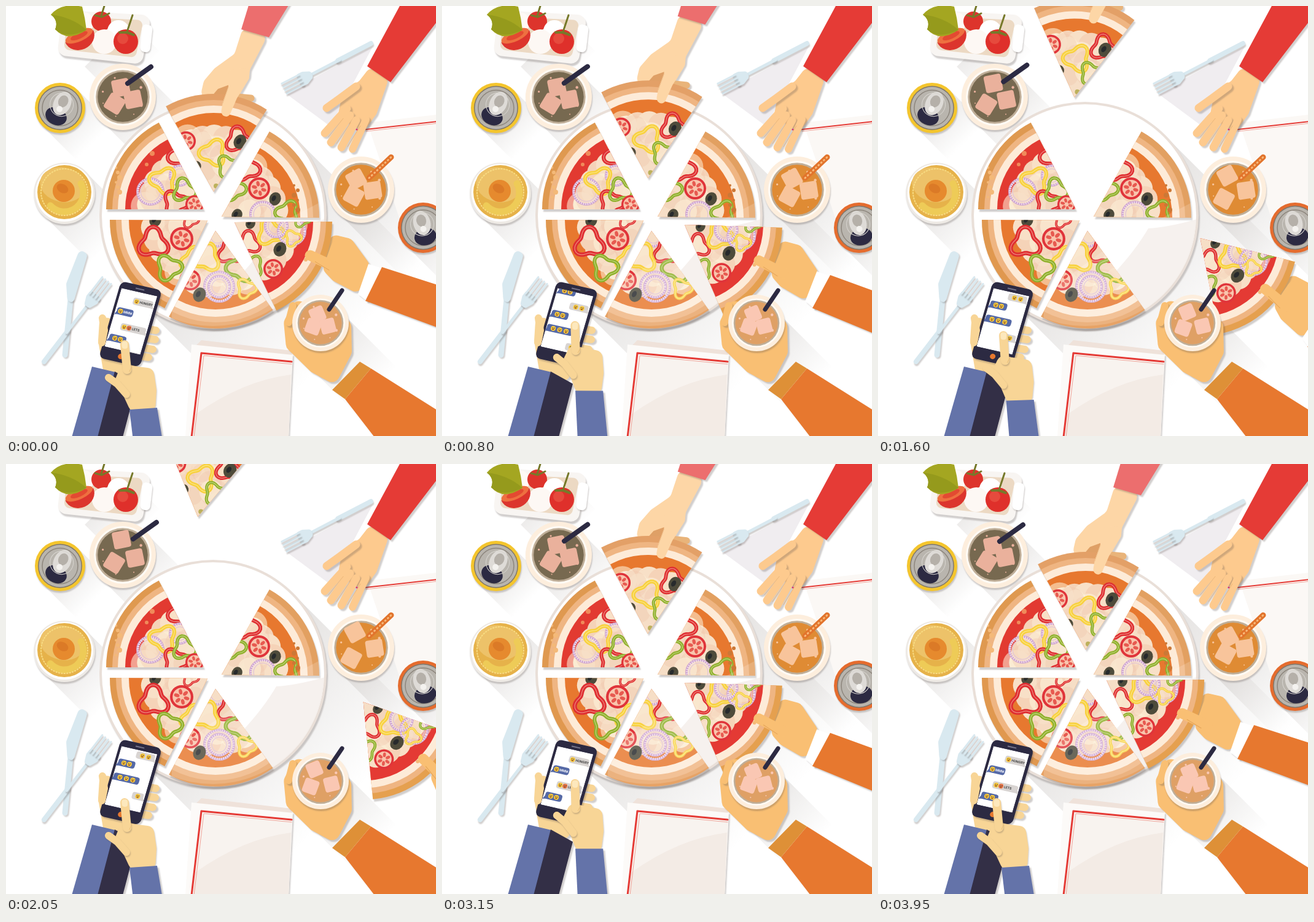
Recreate the animation shown at these times as an HTML page with a canvas. Size 700 by 700 pixels, loop 4000 ms.

```html
<!DOCTYPE html>
<html lang="en">
<head>
<meta charset="utf-8">
<title>Pizza table</title>
<style>
html, body { margin: 0; width: 100%; height: 100%; overflow: hidden; background: #fff; }
canvas { display: block; width: 700px; height: 700px; }
</style>
</head>
<body>
<canvas id="stage" width="700" height="700"></canvas>
<script>
const c = document.getElementById('stage').getContext('2d');
const TAU = Math.PI * 2, DEG = Math.PI / 180, LOOP = 4000, R = 159;
const RED = '#e53b36', ORANGE = '#e7782f', YELLOW = '#f8d13f', GREEN = '#8fb02c';
const NAVY = '#2c2a42', BLUE = '#6473a9', SKIN = '#f9bf73', STEEL = '#d9e9f0';

// ---- motion helpers
function curve(keys) {
  const n = keys.length, slope = [];
  const d = i => (keys[i + 1][1] - keys[i][1]) / (keys[i + 1][0] - keys[i][0]);
  for (let i = 0; i < n; i++) {
    const a = i ? d(i - 1) : 0, b = i < n - 1 ? d(i) : 0;
    slope.push(a * b > 0 ? 2 * a * b / (a + b) : 0);
  }
  return t => {
    let i = 0;
    while (i < n - 2 && t > keys[i + 1][0]) i++;
    const [x, y] = keys[i], [X, Y] = keys[i + 1], h = X - x, u = (t - x) / h, v = 1 - u;
    return v * v * (1 + 2 * u) * y + u * u * (3 - 2 * u) * Y + h * u * v * (v * slope[i] - u * slope[i + 1]);
  };
}
const topPull = curve([[0, 0], [800, .1], [1200, .285], [2000, 1], [2550, .515], [3150, .12], [4000, 0]]);
const sidePull = curve([[0, 0], [800, .108], [1200, .31], [2000, 1], [2550, .425], [3150, .108], [4000, 0]]);
const ramp = (t, a, b) => {
  const u = Math.min(1, Math.max(0, (t - a) / (b - a)));
  return u * u * (3 - 2 * u);
};

// ---- drawing helpers
function fill(color) { c.fillStyle = color; c.fill(); }
function circ(x, y, r, color) { c.beginPath(); c.arc(x, y, r, 0, TAU); fill(color); }
function oval(x, y, rx, ry, rot, color) {
  c.beginPath(); c.ellipse(x, y, rx, ry, rot, 0, TAU); fill(color);
}
function ring(x, y, r, w, color) {
  c.beginPath(); c.arc(x, y, r, 0, TAU);
  c.lineWidth = w; c.strokeStyle = color; c.stroke();
}
function path(p, closed = true) {
  c.beginPath();
  for (let i = 0; i < p.length; i += 2) c.lineTo(p[i], p[i + 1]);
  if (closed) c.closePath();
}
function poly(color, ...p) { path(p); fill(color); }
function line(color, w, ...p) {
  path(p, false);
  c.lineWidth = w; c.strokeStyle = color; c.lineCap = c.lineJoin = 'round'; c.stroke();
}
// closed shape with softened corners
function soft(color, r, ...p) {
  const n = p.length / 2, at = i => [p[(i % n) * 2], p[(i % n) * 2 + 1]];
  const [ax, ay] = at(0), [bx, by] = at(n - 1);
  c.beginPath();
  c.moveTo((ax + bx) / 2, (ay + by) / 2);
  for (let i = 0; i < n; i++) c.arcTo(...at(i), (at(i)[0] + at(i + 1)[0]) / 2, (at(i)[1] + at(i + 1)[1]) / 2, r);
  c.closePath(); fill(color);
}
function box(x, y, w, h, r, color) { c.beginPath(); c.roundRect(x, y, w, h, r); fill(color); }
function at(x, y, rot, draw) {
  c.save(); c.translate(x, y); c.rotate(rot); draw(); c.restore();
}
function cast(x, y, r, len, alpha = .2) {
  at(x, y, Math.PI / 4, () => {
    const g = c.createLinearGradient(0, 0, len, 0);
    g.addColorStop(0, `rgba(135,125,118,${alpha})`);
    g.addColorStop(1, 'rgba(135,125,118,0)');
    c.fillStyle = g; c.fillRect(0, -r, len, 2 * r);
  });
}
function lift(draw, x = 3, y = 3) {
  c.save();
  c.shadowColor = 'rgba(90,80,75,.28)'; c.shadowOffsetX = x; c.shadowOffsetY = y; c.shadowBlur = 2;
  draw(); c.restore();
}

// ---- toppings
const pepper = color => (x, y, s, rot = 0) => at(x, y, rot, () => {
  c.beginPath();
  for (let i = 0; i <= 40; i++) {
    const a = i / 40 * TAU, r = s * (.82 + .2 * Math.cos(3 * a));
    c.lineTo(r * Math.cos(a), r * Math.sin(a));
  }
  c.closePath();
  c.lineWidth = s * .27; c.strokeStyle = color; c.stroke();
  c.lineWidth = 1; c.strokeStyle = 'rgba(255,255,230,.5)'; c.stroke();
});
const red = pepper('#df2f32'), yellow = pepper(YELLOW), green = pepper(GREEN);
function onion(x, y, r) {
  ring(x, y, r, 4, '#cfa6d0');
  c.setLineDash([1.5, 2]); c.lineCap = 'butt';
  ring(x, y, r - 1, 4, '#f2dfea');
  c.setLineDash([]);
  ring(x, y, r - 5, 1.2, '#dfc2da');
}
function tomato(x, y, r) {
  circ(x, y, r, '#e0343a'); circ(x, y, r * .78, '#f9c5ad');
  for (let i = 0; i < 6; i++) at(x, y, i * TAU / 6 + .3, () => oval(r * .44, 0, r * .24, r * .15, 0, '#e75a50'));
}
function olive(x, y, r = 11) {
  oval(x, y, r * .85, r, .4, '#4e4b3b'); oval(x - 2, y - 1, r * .3, r * .45, .5, '#272a2c');
}

// ---- pizza
function sector(r, a, b, color) {
  c.beginPath(); c.moveTo(0, 0); c.arc(0, 0, r, a, b); c.closePath(); fill(color);
}
function slice(x, y, from, to, sauce, crust, tops) {
  const a = from * DEG, b = to * DEG;
  at(x, y, 0, () => {
    lift(() => sector(R, a, b, crust), 2, 4);
    c.save();
    c.beginPath(); c.moveTo(0, 0); c.arc(0, 0, R, a, b); c.closePath(); c.clip();
    circ(0, 0, R - 10, '#efb582');
    circ(0, 0, R - 19, '#fdebd8');
    circ(0, 0, R - 31, sauce);
    circ(0, 0, 84, '#f6dec6');
    for (let i = 0; i < 5; i++) {
      const q = a + (b - a) * (i + .4) / 5;
      circ(88 * Math.cos(q), 88 * Math.sin(q), 21, i % 2 ? '#f5d3b8' : '#f8e0c7');
    }
    for (let i = 0; i < 9; i++) {
      const q = a + (b - a) * ((i * .38 + .15) % 1), r = 35 + (i * 37) % 62;
      circ(r * Math.cos(q), r * Math.sin(q), 15 + i % 3 * 4, i % 2 ? 'rgba(255,246,222,.55)' : 'rgba(238,194,168,.35)');
    }
    c.translate(-x, -y);
    tops();
    c.restore();
  });
}
function topSlice() {
  slice(338, 302, 240.7, 303, ORANGE, '#e3a067', () => {
    onion(288, 264, 17); olive(309, 262, 10); tomato(293, 220, 16);
    red(378, 218, 22, .4); yellow(337, 239, 23, 1); green(361, 261, 19, 2);
    olive(381, 221, 12); red(394, 258, 14); circ(342, 293, 4, '#bcb15c');
  });
}
function sideSlice() {
  slice(372, 352, -.4, 64.6, '#e43a34', '#e5a04f', () => {
    olive(398, 354, 9); red(395, 386, 20, .5); yellow(430, 368, 23, .2);
    onion(465, 367, 22); green(482, 346, 15); onion(440, 358, 18);
    olive(446, 396, 12); green(402, 424, 18, 1); tomato(435, 428, 16);
    yellow(467, 378, 14, 2); circ(488, 413, 3, '#f4b978');
  });
}
function restingSlices() {
  slice(322, 331, 180, 242.6, '#e23a31', '#df9950', () => {
    red(286, 243, 23, .8); onion(283, 276, 16); onion(235, 302, 21);
    yellow(256, 284, 23, 1.2); red(276, 321, 22, 2); green(290, 300, 20, .3); tomato(307, 323, 15);
    for (let i = 0; i < 7; i++) circ(179 + i % 3 * 3, 263 + i * 8, 2 + i % 3, '#f4b978');
    circ(238, 240, 4, '#f08a5a'); circ(229, 258, 3, '#f08a5a');
  });
  slice(328, 349, 180, 244, ORANGE, '#e0984f', () => {
    olive(243, 345, 11); red(240, 386, 26, .5); tomato(286, 379, 19);
    red(295, 350, 16); yellow(305, 414, 22, .7); green(265, 426, 22, 2); tomato(299, 446, 17);
  });
}
function wedges() {
  restingLeft();
  slice(341, 366, 54, 118.5, ORANGE, '#e7a366', () => {
    onion(344, 376, 15); red(365, 400, 22, .5); yellow(326, 410, 24, .8);
    green(382, 426, 24, 1); green(411, 431, 14); tomato(300, 446, 17);
    onion(347, 457, 24); onion(347, 457, 17); olive(315, 470, 12); yellow(391, 460, 17, 2);
  });
  slice(351, 343, 299.3, 360.6, ORANGE, '#e2a061', () => {
    red(391, 264, 23, .2); green(371, 298, 20); tomato(412, 297, 18); olive(438, 314, 11);
    onion(418, 339, 20); green(458, 336, 20, 1); olive(376, 340, 10);
    for (let i = 0; i < 6; i++) circ(469 + i % 2 * 6, 292 + i * 8, 2 + i % 3, '#cc7836');
  });
}
function restingLeft() {
  slice(322, 331, 180, 242.6, '#e23a31', '#df9950', () => {
    red(286, 243, 23, .8); onion(283, 276, 16); onion(235, 302, 21);
    yellow(256, 284, 23, 1.2); red(276, 321, 22, 2); green(290, 300, 20, .3); tomato(307, 323, 15);
    for (let i = 0; i < 7; i++) circ(179 + i % 3 * 3, 263 + i * 8, 2 + i % 3, '#f4b978');
    circ(238, 240, 4, '#f08a5a'); circ(229, 258, 3, '#f08a5a');
  });
  slice(328, 349, 116, 180.4, ORANGE, '#e0984f', () => {
    olive(243, 349, 11); red(240, 386, 26, .5); tomato(286, 379, 19);
    red(300, 348, 14); yellow(305, 414, 22, .7); green(265, 426, 22, 2); tomato(299, 446, 17);
  });
}
function plate() {
  lift(() => circ(337, 341, 185, '#e9dfd8'), 2, 4);
  circ(337, 341, 181, '#fff');
  c.save();
  c.beginPath(); c.arc(337, 341, 181, 0, TAU); c.clip();
  c.beginPath(); c.moveTo(268, 540); c.quadraticCurveTo(395, 440, 440, 362);
  c.quadraticCurveTo(475, 360, 530, 344); c.lineTo(530, 540); c.closePath(); fill('#f4eeea');
  c.restore();
}
function glare() {
  c.save();
  c.beginPath(); c.arc(337, 341, 180, 0, TAU); c.clip();
  poly('rgba(255,255,255,.16)', 270, 470, 385, 385, 530, 310, 530, 540, 270, 540);
  c.restore();
}

// ---- table things
function can(x, y, rim, flip) {
  lift(() => circ(x, y, 41, rim), 1, 3);
  circ(x, y, 36, '#7f776c'); circ(x, y, 34.5, '#b9b5ae');
  ring(x, y, 29, 1.5, '#8d867d');
  at(x, y, flip ? -.25 : .45, () => {
    oval(0, 15, 18, 14, 0, NAVY);
    oval(0, -8, 14, 20, 0, '#dedbd7');
    oval(0, -12, 8, 10, 0, '#b5b0a9');
    ring(0, -6, 19, 1, '#d8d5d0');
    circ(0, 2, 5, '#f4f2ef');
  });
}
function cube(x, y, s, rot, color) {
  at(x, y, rot, () => box(-s / 2, -s / 2, s, s, 4, color));
}
function cup(x, y, r, drink, ice, s, cubes) {
  lift(() => circ(x, y, r, '#fdeedd'), 1, 3);
  circ(x, y, r * .87, '#fffaf4'); circ(x, y, r * .81, '#bfae98'); circ(x, y, r * .755, drink);
  for (let i = 0; i < 8; i++) {
    const a = i * 2.4 + 1;
    circ(x + r * .62 * Math.cos(a), y + r * .62 * Math.sin(a), 1 + i % 3 * .6, ice);
  }
  for (const [cx, cy, rot] of cubes) cube(cx, cy, s, rot, ice);
}
function glass() {
  lift(() => circ(95, 305, 50, '#eeeae5'), 1, 3);
  circ(95, 304, 47, '#fff'); circ(95, 303, 44, '#e6b24a');
  oval(92, 291, 37, 28, .2, '#edc269');
  c.beginPath(); c.arc(95, 304, 31, -.5, 2.4);
  c.lineWidth = 11; c.strokeStyle = '#eecb57'; c.stroke();
  circ(94, 301, 18, '#e68a2e'); oval(92, 297, 10, 7, .5, '#db7a27');
  c.setLineDash([1.5, 3]); ring(95, 303, 38, 2, '#f8dc83'); c.setLineDash([]);
}
function tray() {
  lift(() => soft('#f8f5f2', 14, 92, 7, 237, 15, 221, 95, 83, 80), 2, 4);
  soft('#ecd9c3', 9, 100, 17, 224, 23, 211, 84, 94, 71);
  lift(() => soft('#fff', 7, 222, 28, 239, 33, 234, 77, 218, 73), 1, 2);
  circ(126, 27, 17, '#fffaf6');
  circ(155, 25, 16, '#dd342c');
  line('#76792a', 3, 155, 16, 160, 0); line('#76792a', 3, 145, 15, 156, 18, 168, 12);
  circ(183, 41, 18, '#fff'); circ(160, 58, 20, '#fdf8f4');
  at(121, 53, -.42, () => {
    c.beginPath(); c.ellipse(0, -4, 25, 22, 0, 0, Math.PI); fill('#dc352d');
    oval(0, -5, 24, 9, 0, '#ee7040'); oval(0, -5, 15, 5, 0, '#e34a31');
  });
  circ(195, 58, 20, '#df302b'); circ(190, 53, 9, '#e64a3d');
  line('#76792a', 3, 197, 42, 206, 15); line('#76792a', 4, 185, 43, 197, 43, 208, 47);
  c.beginPath(); c.moveTo(73, 14); c.quadraticCurveTo(90, -6, 124, 1);
  c.quadraticCurveTo(129, 20, 131, 39); c.quadraticCurveTo(100, 60, 80, 38);
  c.quadraticCurveTo(86, 24, 73, 14); fill('#a4a621');
  c.beginPath(); c.moveTo(73, 14); c.quadraticCurveTo(108, 18, 131, 39);
  c.quadraticCurveTo(98, 55, 80, 38); c.quadraticCurveTo(86, 24, 73, 14); fill('#959a1c');
}
function fork(x, y, rot, len) {
  at(x, y, rot, () => lift(() => {
    line(STEEL, 8, 0, 0, len * .38, 0);
    line(STEEL, 5, len * .36, 0, len * .72, 0);
    soft(STEEL, 4, len * .68, -5, len * .76, -11, len * .83, -11, len * .83, 11, len * .76, 11, len * .68, 5);
    for (let i = -1.5; i < 2; i++) line(STEEL, 3, len * .8, i * 6, len, i * 6);
  }, 1, 3));
}
function cutlery() {
  lift(() => {
    line(STEEL, 9, 96, 568, 105, 478);
    soft(STEEL, 7, 100, 482, 98, 452, 120, 396, 133, 404, 110, 482);
  }, 2, 2);
  fork(62, 579, -.914, 167);
}
function mats() {
  poly('#fbf8f5', 588, 190, 700, 177, 700, 372, 640, 345, 622, 290);
  line(RED, 2, 586, 201, 702, 188); line('#f0a49a', 1, 586, 204, 702, 191);
  poly('#efe2da', 318, 544, 465, 561, 466, 573, 302, 560);
  lift(() => poly('#fcfaf8', 302, 551, 467, 568, 460, 702, 292, 702), 2, 2);
  poly('#f8f3ef', 319, 566, 466, 580, 460, 702, 303, 702);
  c.beginPath(); c.moveTo(464, 600); c.quadraticCurveTo(385, 610, 308, 665);
  c.lineTo(303, 702); c.lineTo(460, 702); c.closePath(); fill('#f3ebe5');
  line(RED, 3, 465, 579, 318, 565, 302, 702);
  line('#f0a49a', 1, 465, 583, 322, 569, 306, 702);
}
function shadows() {
  cast(337, 341, 184, 300, .24);
  cast(88, 166, 41, 78); cast(190, 148, 52, 100); cast(95, 305, 49, 110);
  cast(578, 299, 53, 150); cast(679, 361, 40, 100); cast(165, 62, 52, 70, .15);
  cast(512, 535, 50, 125);
  c.save(); c.globalAlpha = .75;
  poly('#ebe7eb', 455, 142, 597, 66, 528, 196);
  c.restore();
}
function redHand() {
  const skin = '#fdca8e';
  lift(() => {
    soft(skin, 10, 593, 99, 623, 119, 603, 176, 582, 205, 540, 180, 548, 140, 575, 122);
    line(skin, 13, 570, 131, 543, 151, 522, 166);
    line(skin, 13, 555, 167, 519, 207); line(skin, 13, 560, 178, 529, 222);
    line(skin, 13, 570, 186, 546, 230); line(skin, 12, 586, 185, 564, 233);
  });
  line('#eeb678', 1, 549, 183, 525, 213); line('#eeb678', 1, 561, 190, 538, 224);
  line('#eeb678', 1, 577, 195, 556, 229);
  circ(571, 201, 1.6, '#d2396a');
  lift(() => poly(RED, 642, -2, 702, -2, 702, 25, 626, 124, 588, 98));
}

// ---- moving hands
function pulled(x, y, dx, dy, rot, draw) {
  at(x + dx, y + dy, rot, () => { c.translate(-x, -y); draw(); });
}
function topGrab(p) {
  pulled(338, 302, -26 * p, -218 * p, 7 * p * DEG, () => {
    const skin = '#fdd6a6';
    lift(() => {
      soft(skin, 12, 386, 34, 427, 46, 397, 104, 396, 116, 376, 152, 330, 155, 317, 144, 322, 122, 340, 101, 372, 78);
      line('#e9b47a', 11, 378, 148, 399, 150);
    });
    poly('#dfa066', 334, 148, 345, 135, 364, 128, 358, 152);
    topSlice();
    soft(skin, 8, 362, 104, 396, 100, 396, 118, 376, 150, 363, 180, 349, 180, 353, 156, 362, 132);
    line('#f0c08c', 1, 362, 132, 353, 158);
    lift(() => poly('#ec6e6e', 402, -24, 474, -24, 428, 51, 383, 38));
  });
}
function sideGrab(p) {
  pulled(372, 352, 212 * p, 36 * p, 20 * p * DEG, () => {
    lift(() => soft(SKIN, 12, 528, 371, 562, 379, 592, 420, 576, 470, 532, 447, 516, 430));
    sideSlice();
    soft(SKIN, 11, 532, 382, 563, 382, 590, 422, 576, 468, 533, 447, 517, 424, 524, 404);
    line(SKIN, 17, 495, 406, 536, 425);
    line('#e4a45a', 1, 503, 416, 526, 430);
    lift(() => poly('#fff', 590, 420, 613, 427, 588, 481, 573, 469));
    lift(() => poly(ORANGE, 612, 425, 780, 479, 780, 552, 585, 480));
  });
}
function cupHand(p) {
  lift(() => {
    soft(SKIN, 13, 470, 479, 452, 514, 456, 556, 497, 596, 536, 617, 563, 565, 562, 518, 542, 492);
    line(SKIN, 12, 467, 488, 460, 515);
  });
  cup(512, 516, 46, '#dfa065', '#fac7b3', 24, [
    [507 - 5 * p, 502 - 5 * p, -.4], [500 - 4 * p, 522 + 3 * p, .35], [524 + 6 * p, 521, -.25]]);
  line(NAVY, 7, 526, 494, 547, 463);
  lift(() => poly(ORANGE, 552, 640, 594, 590, 702, 658, 702, 702, 600, 702));
  poly('#de9037', 531, 625, 576, 579, 594, 590, 552, 640);
}

// ---- phone
function face(x, y, color = '#f9c93d') {
  circ(x, y, 4, color); circ(x - 1.4, y - 1, .7, NAVY); circ(x + 1.4, y - 1, .7, NAVY);
  c.beginPath(); c.arc(x, y + .6, 1.8, 0, Math.PI); fill('#8a4a25');
}
// position, left edge, width, own message, faces, text
const chat = [
  [26, 27, 33, 0, 1, 'HUNGRY'], [47, 6, 27, 1, 1, 'MMM'], [71, 19, 42, 0, 2, 'LETS'], [92, 6, 28, 1, 2, ''],
  [114, 30, 31, 0, 2, ''], [132, 5, 28, 1, 2, ''], [156, 4, 43, 1, 3, ''], [180, 42, 19, 0, 1, '']];
function bubble(y, [, x, w, mine, faces, text]) {
  box(x, y - 6, w, 12, 4, mine ? '#5569a6' : '#d8d4d2');
  poly(mine ? '#5569a6' : '#d8d4d2', mine ? x : x + w, y + 1, mine ? x - 3 : x + w + 3, y + 7, mine ? x + 6 : x + w - 6, y + 5);
  const step = text ? 8 : w / (faces + 1);
  for (let i = 0; i < faces; i++) face(x + (text ? 6 : step) + i * step, y, i && text ? '#ec7a4a' : undefined);
  if (text) {
    c.fillStyle = mine ? '#fff' : '#444'; c.font = 'bold 5.5px Roboto, sans-serif';
    c.fillText(text, x + 3 + faces * step, y + 2);
  }
}
function phone(scroll) {
  const skin = '#f8d596';
  lift(() => {
    for (const [x, y] of [[244, 528], [243, 543], [239, 559], [232, 572]]) line(skin, 12, x - 25, y - 4, x, y);
    soft(skin, 12, 153, 498, 168, 508, 170, 560, 215, 580, 205, 612, 160, 604, 150, 545);
  });
  lift(() => {
    poly(BLUE, 140, 587, 178, 596, 152, 702, 107, 702);
    poly('#332f46', 177, 595, 213, 615, 190, 702, 149, 702);
  });
  c.save();
  c.transform(.97, .22, -.28, .96, 188, 449);
  lift(() => box(-1, -1, 69, 130, 9, NAVY), 2, 3);
  box(25, 4, 15, 2, 1, '#77758a'); circ(33, 119, 4.5, ORANGE);
  c.beginPath(); c.rect(3, 10, 60, 99); c.clip();
  fill('#fff');
  for (const m of chat) for (const lap of [0, 192, 384]) {
    const y = m[0] + lap - scroll;
    if (y > 0 && y < 120) bubble(y, m);
  }
  c.restore();
  line(skin, 12, 157, 508, 160, 528, 156, 548);
}
function tapHand(u) {
  const skin = '#f8d596';
  pulled(228, 700, 13 * u, -29 * u, 4 * u * DEG, () => {
    lift(() => {
      soft(skin, 12, 188, 583, 206, 586, 240, 590, 245, 625, 243, 660, 203, 660, 190, 632, 176, 612);
      line(skin, 14, 193, 551, 197, 592);
      line(skin, 12, 167, 605, 181, 615, 196, 632);
    }, 1, 2);
    soft('#fde8bd', 4, 188, 546, 198, 546, 198, 558, 189, 558);
    line('#e8bd78', 1, 205, 586, 201, 595);
    lift(() => poly(BLUE, 201, 657, 246, 654, 262, 750, 212, 750));
  });
}

function draw(t) {
  const top = topPull(t), side = sidePull(t), half = t % 2000;
  const tap = ramp(half, 390, 810) - ramp(half, 1280, 1900);
  const scroll = 96 * (ramp(t, 310, 970) + ramp(t, 2310, 2970));
  c.fillStyle = '#fff'; c.fillRect(0, 0, 700, 700);
  shadows();
  mats();
  plate();
  tray();
  can(88, 166, '#f4c52d', false);
  cup(190, 148, 54, '#776950', '#eab19c', 28, [
    [187 + top, 133 - 10 * top, -.2], [177 - top, 159 + 2 * top, .55], [207 + 3 * top, 152 + top, -.2]]);
  line(NAVY, 8, 198 + 9 * top, 126 - 4 * top, 236 + 9 * top, 99 - 4 * top);
  glass();
  fork(594, 61, 152.5 * DEG, 159);
  cutlery();
  wedges();
  glare();
  cup(578, 299, 54, '#df8b34', '#f8c49b', 28, [
    [570 - 2 * side, 282 - 8 * side, -.5], [566 - 4 * side, 309 + 7 * side, .5], [597 + 3 * side, 300, -.15]]);
  line('#e2742c', 9, 591, 280, 627, 246);
  c.setLineDash([1, 5]); line('#f8b878', 3, 591, 280, 627, 246); c.setLineDash([]);
  can(679, 361, '#e56c2e', true);
  redHand();
  topGrab(top);
  sideGrab(side);
  cupHand(side);
  phone(scroll);
  tapHand(tap);
}

const start = performance.now();
function frame() {
  draw((performance.now() - start) % LOOP);
  requestAnimationFrame(frame);
}
frame();
</script>
</body>
</html>
```
